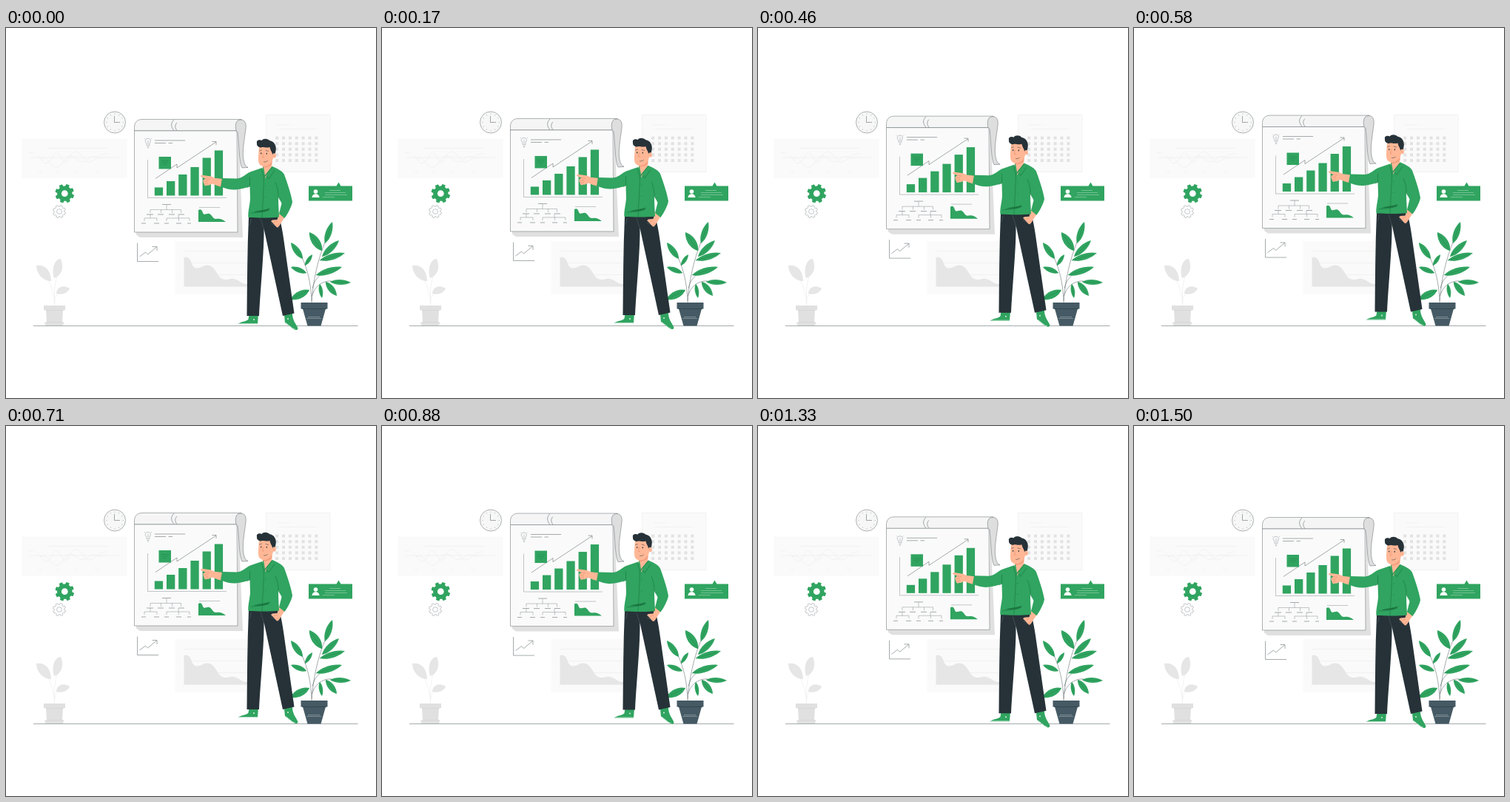
Animation of 500x500 px, one loop 1540 ms. Source, as an HTML page:

```html
<!DOCTYPE html>
<html lang="en">
<head>
<meta charset="utf-8">
<title>Presenting the results</title>
<style>
html, body { margin: 0; width: 100%; height: 100%; overflow: hidden; background: #fff; }
svg { display: block; width: 100vw; height: 100vh; }
.g { fill: #30a460; }
.skin { fill: #ffb796; }
.dark { fill: #263238; }
.ln { fill: none; stroke: #4d565a; stroke-width: .5; }
.thin { fill: none; stroke: #6b7376; stroke-width: .4; }
.edge { stroke: #4d565a; stroke-width: .45; }
.fold { fill: none; stroke: #1b7440; stroke-width: .6; stroke-linecap: round; }
.vein { fill: none; stroke: #1f7d47; stroke-width: .4; }
.crease { fill: none; stroke: #db8564; stroke-width: .5; }
.pale { fill: none; stroke: #ebebeb; stroke-width: .6; }
.pane { fill: #fafafa; }
.gray { fill: #e6e6e6; }
</style>
</head>
<body>
<svg viewBox="0 0 500 500" xmlns="http://www.w3.org/2000/svg">
  <rect width="500" height="500" fill="#fff"/>

  <!-- wall panels -->
  <rect class="pane" x="21.500" y="149.500" width="142" height="53.500"/>
  <path class="pale" d="M56 162.500H138M31 168.500H38M31 175H153M44 194H49M68 194H73M92 194H97M120 194H125"/>
  <path class="pale" d="M43 172C49 178 53 188 59 180S64 167 70 170S78 189 84 178S92 165 99 169S105 182 113 181S123 170 137 170"/>
  <path class="pale" d="M46 177C55 170 60 189 69 188S82 168 91 174S103 184 112 176S125 182 134 173"/>

  <rect class="pane" x="351" y="117" width="87" height="77.500"/>
  <path class="pale" d="M351.500 194.500V117.500H438V194.500Z"/>
  <path class="pale" d="M366 131H383M369 136.500H419"/>
  <g id="days" fill="#e2e2e2"></g>

  <rect class="pane" x="228.500" y="288" width="105" height="72"/>
  <path class="pale" d="M240 301.500H327M240 317.500H327M240 333.500H327"/>
  <path class="gray" d="M240.500 349.500V310C245 308 249 311 251 318C254 327 261 325 266 322C274 318 280 322 285 331C290 341 296 341 303 339C313 337 318 347 326 346V349.500Z"/>

  <!-- clock -->
  <circle class="edge" cx="147" cy="127.500" r="14.500" fill="#f7f7f7"/>
  <path class="ln" d="M146.500 119V127.500H154"/>
  <g id="ticks" class="thin"></g>

  <!-- gears -->
  <path id="gear1" class="g" fill-rule="evenodd"/>
  <path id="gear2" class="thin"/>
  <circle class="thin" cx="72" cy="248" r="3.400"/>

  <!-- pale plant -->
  <path class="pale" d="M65.500 375C65 360 62 348 55 338M65.500 372C65 356 66 346 69 335M65.500 372C66 363 69 359 73 356"/>
  <path class="gray" d="M61 342C50 342 41 332 41 321C51 319 61 326 61 342ZM65 338C61 325 66 312 74 312C79 324 75 335 65 338ZM68 359C68 350 78 346 86 352C83 359 75 361 68 359Z"/>
  <path fill="#e0e0e0" d="M51 375H80V381H51ZM54 381H77L76 397.500H55ZM52 397.500H78.500L77 402H53.500Z"/>
  <path fill="none" stroke="#d4d4d4" stroke-width=".6" d="M53 381.500H78M54.500 397.500H77"/>

  <!-- card -->
  <path class="g" d="M409 213.500H446.500L449.500 208.500L452.500 213.500H468V233.500H409Z"/>
  <circle cx="418.500" cy="221" r="2.800" fill="#fff"/>
  <path fill="#fff" d="M413.500 229C413.500 222.500 423.500 222.500 423.500 229Z"/>
  <path fill="none" stroke="#9fd6b5" stroke-width=".6" d="M437 219.500H452M431 222.500H459M431 225.500H461M428 228.500H444"/>

  <path class="ln" d="M37 402.500H475.500"/>

  <!-- plant -->
  <path class="ln" d="M413 371C415 342 421 312 433 285M413.500 362C418 347 430 341 440 342M413 369C412 345 408 328 400 310M414 352C416 343 420 337 428 331M405 331L398 327M404.500 321L408 315"/>
  <g id="leaves"></g>
  <path fill="#455a64" d="M398.500 371H434.500V379.500H432L425.500 402.500H407.500L401 379.500H398.500Z"/>
  <path fill="none" stroke="#2d3d45" stroke-width=".7" d="M400 379.500H433"/>
  <path fill="none" stroke="#a6b3b9" stroke-width=".6" d="M408 390.500H424M406 392.500H426"/>

  <g id="float">
    <!-- small chart -->
    <path class="ln" d="M177.500 290.500V315.500H206M180.500 309L188.500 303L191.500 306L203.500 296M197.500 295.500H204V301"/>

    <!-- flip chart -->
    <path fill="#e0e0e0" d="M176 276V279.500L181 283H320L316 186L313 139V276Z"/>
    <path class="edge" fill="#f5f5f5" d="M173.500 139V134C173.500 128 177 123.500 184 123.500H318L312 139Z"/>
    <path class="edge pane" d="M173.500 139H312L313 276H173.500Z"/>
    <path class="edge" fill="#dedede" d="M311 139C309 130 311 124 317 124C323 124 325 129 324 136C322 152 319 167 321 178C322 184 324 187.500 327 188.500L319 189C315 183 315 157 313 141Z"/>
    <path class="ln" d="M227 124C222 129 223 134 227 138.500M231 128C228 131 228 135 231 138.500"/>

    <path class="thin" d="M190 158.500V156C187 153 188 149.500 192 149.500S196 153 194 156V158.500ZM190.500 160.500H193.500M191 162H193M187 149L188 150M197 149L196 150M192 152V157"/>
    <path class="ln" d="M201 152H242M201 155.500H216M219.500 155.500H225"/>
    <path class="thin" d="M191.500 178V229.500H298"/>
    <g id="bars" class="g"></g>
    <path class="ln" d="M202 203.500L231 184V189L284 154M278.500 153.500H284V158"/>
    <path class="g" d="M206.500 174H223V190.500H206.500Z"/>
    <path class="vein" d="M210 179.500H220M210 182H219M212 184.500H217"/>

    <path class="thin" d="M217 239V245.500M195 250V245.500H236.500V250M209.500 245.500V250M224.500 245.500V250M195 252V257M187 261V257H204V261M233 252V257M217 261V257H248V261M233.500 257V261"/>
    <path class="ln" d="M211 238.500H223M190 252H199M205 252H213M220 252H228M233 252H241M183 264H189M200 264H207M214 264H220M230 264H237M245 264H250"/>
    <path class="thin" d="M261 242.500H289"/>
    <path class="g" d="M260 262V246C263 244 265 246 266 250C268 254 271 250 275 251C279 253 279 258 284 258C290 257 293 259 297 262Z"/>

    <!-- hand on chart -->
    <path class="skin" d="M293 204L282 202.800L277 200.500L265 198.800C262.500 199 262.500 200.800 264.500 201.500L269.500 203.500L266.500 205.500C266 207.500 267 209 267.500 210.500C268 213.500 270.500 214 272 212.500C274.500 213.500 276 211 279 210.500L285 213L291 214.800Z"/>
    <path class="crease" d="M269.500 203.500L275 204.500M268 207.500L273 206.500M269 211L273 209"/>

    <!-- shoes -->
    <path class="g" d="M328.500 387H341L340 400H314C317 396.500 325 397 327.500 393.500ZM376 388L387 385C386.500 395 393 401 394.500 406C394 409 390 408.500 387 406L377 398Z"/>
    <path fill="none" stroke="#d7efe1" stroke-width=".8" d="M315 399.500H340M378 398.500L387 405.700L391 407.500"/>
    <circle cx="335" cy="394" r="1" fill="#d7efe1"/>
    <circle cx="381" cy="393" r="1" fill="#d7efe1"/>

    <!-- trousers -->
    <path class="dark" d="M328 255H369C373 268 375 283 378 305L389.500 385.500L374 389L348.500 271C349 300 344 350 342 389H325.500C326 345 326 300 328 255Z"/>
    <path fill="none" stroke="#56666e" stroke-width=".5" d="M344 258C346 263 347 268 348.500 272M331 258C331 262 330 265 328 267M358 264L369 270"/>

    <!-- head -->
    <path class="skin" d="M347 181L360 176L359 190C358 196 353 202 348 203C345 199 346 191 347 187Z"/>
    <path fill="#f29c7c" d="M348 186.500C354 186.500 357 183 359.500 179.500L359 184C356 188 351 189 348 188.500Z"/>
    <path class="skin" d="M342 161C348 155 362 158 362 170C361.500 180 356 187 349 187C342 187 340.500 182 341 174Z"/>
    <path class="dark" d="M339 155.500C338 151.500 343 150.500 345.500 152C348 148.500 354 149.500 356 152C363 153 366 160 364.500 166L363.500 171H360C360 168 357 165 356.500 161C351 162.500 347 160 345 161.500C341 161.500 338.500 159 339 155.500Z"/>
    <ellipse class="skin" cx="362.500" cy="172.500" rx="2.400" ry="3.200"/>
    <path fill="none" stroke="#263238" stroke-width=".5" stroke-linecap="round" d="M342.500 166L345.500 165.200M351 165.500L354.500 166.500M348.500 181C350.500 181.200 352.500 180.500 353.500 179.500"/>
    <path class="crease" d="M347.500 169L346.500 175H349M361.500 172L363 174"/>
    <ellipse class="dark" cx="344.700" cy="169.500" rx=".7" ry="1.100"/>
    <ellipse class="dark" cx="352.300" cy="169.800" rx=".7" ry="1.100"/>

    <!-- hip hand and shirt -->
    <path class="skin" d="M369 250L376.500 256L371 264.500C369 268 367.500 270.500 365.500 269L361 264L358 261L360 259.500L366.500 259Z"/>
    <path class="crease" d="M362 263L367 261M365 268L369 264"/>
    <path class="g" d="M346 189L330 194.500C323 198 319 203 312 203.500L292 203L290 214.500C297 217 304 219 310 218.500C318 218 324 216 329.500 214L330 231C329.500 240 326.500 249 327.500 256C341 256.500 357 257 369 255.500C369 249 368 242 368 228L372.500 237L369 251L376.500 257C381 251 386 241 387 235C385 223 380 209 376 198C374 194 369 191 360 187L350 203Z"/>
    <path class="g" d="M348 187L345 193L349 203L352 198L356 204L363 193L359.500 187L350 199Z"/>
    <path class="fold" d="M345.500 191L348.500 203L350.500 199L359.500 188M351.500 199L355 204L362.500 193M348.500 203C348 221 347 236 346 256"/>
    <path class="fold" d="M329.500 202V214L326 215.500M364 209C366 213 368 219 368 228L370 232M331 250C340 250 347 249 356 246"/>
    <path fill="#1b7440" d="M334 249C341 246 349 246.500 356.500 243.500C355 249 345 248.500 334 249Z"/>
    <circle cx="351" cy="213" r=".5" fill="#1b7440"/>
    <circle cx="350.500" cy="228" r=".5" fill="#1b7440"/>
  </g>
</svg>
<script>
const $ = id => document.getElementById(id);
const LOOP = 1540, PEAK = 730, RISE = 6;

const rect = (x, y, w, h) => `<rect x="${x}" y="${y}" width="${w}" height="${h}"/>`;

// calendar squares
let days = '';
for (let r = 0; r < 5; r++)
  for (let c = 0; c < 7; c++)
    days += rect(364.2 + c * 8.85, 146.6 + r * 7.6, 4, 4);
$('days').innerHTML = days;

// clock marks
let ticks = '';
for (let i = 0; i < 12; i++)
  ticks += `<path d="M147 115.500V117" transform="rotate(${i * 30} 147 127.500)"/>`;
$('ticks').innerHTML = ticks;

// growing bars on a shared base
const tops = [215.5, 207, 198, 188, 175.5, 165.5];
$('bars').innerHTML = tops.map((y, i) => rect(200.8 + i * 16.2, y, 11.3, 226.5 - y)).join('');

function gear(cx, cy, outer, inner, teeth, turn) {
  const pts = [];
  for (let i = 0; i < teeth; i++)
    for (const [k, r] of [[-.33, inner], [-.22, outer], [.22, outer], [.33, inner]]) {
      const a = (i + k) * 2 * Math.PI / teeth + turn;
      pts.push((cx + r * Math.cos(a)).toFixed(2) + ' ' + (cy + r * Math.sin(a)).toFixed(2));
    }
  return 'M' + pts.join('L') + 'Z';
}
const hole = (cx, cy, r) => `M${cx - r} ${cy}a${r} ${r} 0 1 0 ${2 * r} 0a${r} ${r} 0 1 0 ${-2 * r} 0Z`;
$('gear1').setAttribute('d', gear(79.3, 223.7, 13, 10.2, 8, .34) + hole(79.3, 223.7, 4.4));
$('gear2').setAttribute('d', gear(72, 248, 8.6, 6.8, 8, .34));

// leaf from base to tip, bulging by w on both sides
function leaf([x1, y1, x2, y2, w]) {
  const dx = x2 - x1, dy = y2 - y1, len = Math.hypot(dx, dy);
  const at = (k, s) => `${x1 + dx * k - dy / len * s} ${y1 + dy * k + dx / len * s}`;
  return `<path class="g" d="M${x1} ${y1}C${at(.25, w)} ${at(.7, w)} ${x2} ${y2}C${at(.7, -w)} ${at(.25, -w)} ${x1} ${y1}Z"/>`
    + `<path class="vein" d="M${x1} ${y1}L${at(.85, 0)}"/>`;
}
$('leaves').innerHTML = [
  [431, 291, 441, 262, 5.5], [427, 301, 410, 276, 7], [427, 309, 450, 287, 5.5],
  [424, 314, 458, 304, 5.5], [419, 334, 454, 323, 5.5], [438, 343, 466, 344, 4.5],
  [432, 343, 447, 362, 5.5], [424, 346, 427, 365, 3.5], [410, 354, 384, 367, 6.5],
  [406, 331, 385, 323, 4.5], [404, 321, 414, 306, 3.5], [401, 312, 385, 290, 5.5]
].map(leaf).join('');

const stage = $('float');
function draw(t) {
  const lift = RISE * (1 + Math.cos(2 * Math.PI * (t - PEAK) / LOOP)) / 2;
  stage.setAttribute('transform', `translate(0 ${-lift.toFixed(3)})`);
}

const start = performance.now();
function tick() {
  draw((performance.now() - start) % LOOP);
  requestAnimationFrame(tick);
}
tick();
</script>
</body>
</html>
```
